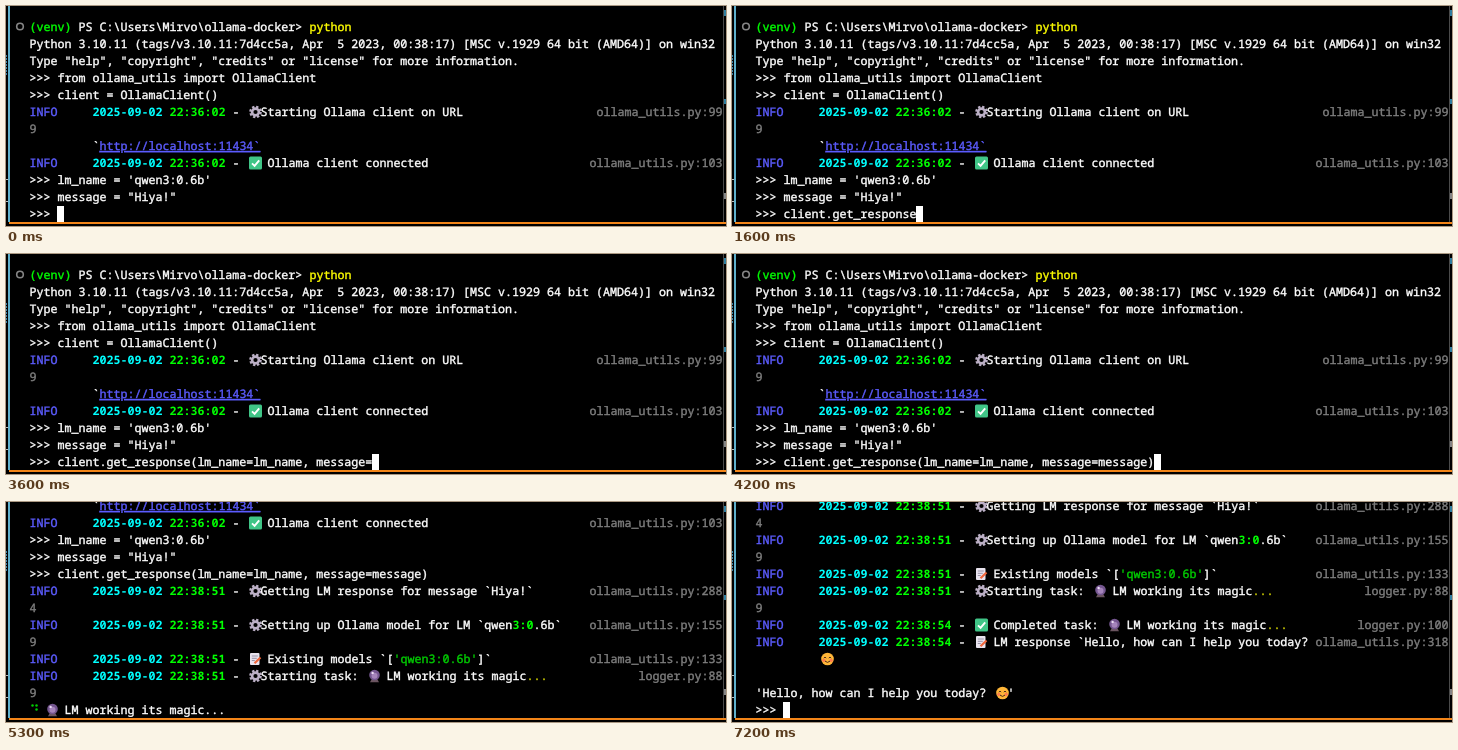
Write an HTML page that moves like this. It is 720 px wide and 220 px high and loops after 7.3 s.

```html
<!DOCTYPE html>
<html lang="en">
<head>
<meta charset="utf-8">
<title>Terminal session</title>
<style>
  html, body { margin: 0; width: 100%; height: 100%; overflow: hidden; background: #000; }
  svg { display: block; }
  text {
    font: 11.667px "Noto Sans Mono", "DejaVu Sans Mono", monospace;
    text-rendering: geometricPrecision;
    white-space: pre;
    color: #fff;
    fill: currentColor;
    stroke: currentColor;
    stroke-width: .4px;
  }
  .bold, .lime, .cyan { font-weight: 700; stroke: none; }
  .green { color: #00cd00; }
  .bright, .lime { color: #0f0; }
  .cyan { color: #0ff; }
  .yellow { color: #ff0; }
  .dots { color: #cdcd00; }
  .blue, .link { color: #5c5cff; }
  .link { text-decoration: underline; }
  .gray { color: #7f7f7f; }
</style>
</head>
<body>
<svg id="stage" width="720" height="220" viewBox="0 0 720 220">
  <defs>
    <g id="gear" fill="none" stroke="#bcb0c6">
      <circle cx="6.5" cy="6.5" r="5.2" stroke-width="2.2" stroke-dasharray="2.3 1.784"/>
      <circle cx="6.5" cy="6.5" r="3.4" stroke-width="2.6"/>
    </g>
    <g id="check">
      <rect width="13" height="13" rx="1.5" fill="#40c587"/>
      <path d="M3 6.8 5.6 9.4 10.2 3.8" fill="none" stroke="#fff" stroke-width="1.9"/>
    </g>
    <g id="memo">
      <rect x="1" y=".5" width="9.5" height="12" rx="1" fill="#e9e4ef"/>
      <path d="M2.8 3.5h6M2.8 5.8h5M2.8 8h3" stroke="#9a93a8"/>
      <path d="M5.5 10.8 11.5 5" stroke="#f0663c" stroke-width="2.2"/>
    </g>
    <g id="ball">
      <path d="M2 12.8 3.8 9.5h5.4l1.8 3.3z" fill="#6b5560"/>
      <circle cx="6.5" cy="5.5" r="5.3" fill="#74568f"/>
      <circle cx="6.5" cy="6.3" r="3" fill="#a584bb"/>
      <circle cx="4.6" cy="3.4" r="1.2" fill="#ecdcf5"/>
    </g>
    <g id="smile">
      <circle cx="6.5" cy="6.5" r="6.3" fill="#ffb638"/>
      <circle cx="2.8" cy="7.8" r="1.6" fill="#ff7a4d"/>
      <circle cx="10.2" cy="7.8" r="1.6" fill="#ff7a4d"/>
      <path d="M2.8 5.6q1.2-2 2.4 0M7.8 5.6q1.2-2 2.4 0M4 8.6q2.5 2.6 5 0" fill="none" stroke="#4a2d1c"/>
    </g>
  </defs>
  <g id="log"><circle cx="14" cy="20.5" r="3.3" fill="none" stroke="#858585" stroke-width="1.6"/></g>
  <g id="spinner"></g>
  <rect id="cursor" y="200" width="7" height="16" fill="#fff"/>
  <g id="frame">
    <path d="M717.5 0V216" stroke="#4a4a4a"/>
    <path d="M718 4h2v6h-2zM718 93h2v5h-2z" fill="#2f7fa0"/>
    <path d="M718 187h2v6h-2z" fill="#858585"/>
    <path d="M.5 49V70" stroke="#3d85a8" stroke-dasharray="2 1"/>
    <path d="M0 173.5h2M0 195.5h2" stroke="#bbb"/>
    <rect x="2" width="2" height="216" fill="#5fb0cc"/>
    <rect x="3" y="216" width="717" height="2" fill="#f38518"/>
  </g>
</svg>
<script>
const LOOP = 7300, STEP = 100, RUN = 4300, DONE = 7100;
const LEFT = 23, TOP = 13, CELL = 7, LINE = 17, SCREEN_ROWS = 12;
const COMMAND = "client.get_response(lm_name=lm_name, message=message)";
const TYPING = [[0, 0], [800, 10], [2400, 28], [3200, 38], [3600, 45], [4000, 51], [4200, 53]];
const SPINNER = "⠋⠙⠹⠸⠼⠴⠦⠧⠇⠏", SPIN_MS = 87.5;

const $ = id => document.getElementById(id);
const log = $("log"), spinner = $("spinner"), cursor = $("cursor");
const rows = [];

function add(parent, tag, attrs = {}) {
  const node = document.createElementNS("http://www.w3.org/2000/svg", tag);
  for (const key in attrs) node.setAttribute(key, attrs[key]);
  return parent.appendChild(node);
}

// Parts: a number jumps to a column, "#name" is a two-cell icon, [text, style] is coloured text.
function write(parent, line, parts) {
  let col = 0;
  for (const part of parts) {
    if (typeof part === "number") { col = part; continue; }
    const [text, style = ""] = [].concat(part);
    const x = LEFT + col * CELL, y = TOP + line * LINE;
    if (text[0] === "#") {
      add(parent, "use", { href: text, x: x + 3, y: y + 1.5 });
      col += 2;
    } else {
      add(parent, "text", { x: x + .5, y: y + 12, class: style }).textContent = text;
      col += text.length;
    }
  }
}

function row(...parts) {
  const group = add(log, "g");
  write(group, rows.length, parts);
  rows.push(group);
}

function info(time, path, ...parts) {
  row(["INFO", "blue"], 9, ["2025-09-02", "cyan"], " ", [time, "lime"], " - ",
    ...parts, 99 - path.length, [path, "gray"]);
}

const task = ["#ball", " LM working its magic", ["...", "dots"]];

row(["(venv)", "bright"], " PS C:\\Users\\Mirvo\\ollama-docker> ", ["python", "yellow"]);
row("Python 3.10.11 (tags/v3.10.11:7d4cc5a, Apr  5 2023, 00:38:17) [MSC v.1929 64 bit (AMD64)] on win32");
row('Type "help", "copyright", "credits" or "license" for more information.');
row(">>> from ollama_utils import OllamaClient");
row(">>> client = OllamaClient()");
info("22:36:02", "ollama_utils.py:99", "#gear", "Starting Ollama client on URL");
row(["9", "gray"]);
row(9, "`", ["http://localhost:11434`", "link"]);
info("22:36:02", "ollama_utils.py:103", "#check", " Ollama client connected");
row(">>> lm_name = 'qwen3:0.6b'");
row('>>> message = "Hiya!"');
row(">>> ", " ");
const typed = rows[11].lastChild;
info("22:38:51", "ollama_utils.py:288", "#gear", "Getting LM response for message `Hiya!`");
row(["4", "gray"]);
info("22:38:51", "ollama_utils.py:155", "#gear", "Setting up Ollama model for LM `qwen", ["3:0", "lime"], ".6b`");
row(["9", "gray"]);
info("22:38:51", "ollama_utils.py:133", "#memo", " Existing models `", ["[", "bold"],
  ["'qwen3:0.6b'", "green"], ["]", "bold"], "`");
info("22:38:51", "logger.py:88", "#gear", "Starting task: ", ...task);
row(["9", "gray"]);
info("22:38:54", "logger.py:100", "#check", " Completed task: ", ...task);
info("22:38:54", "ollama_utils.py:318", "#memo", " LM response `Hello, how can I help you today?");
row(9, "#smile");
row();
row("'Hello, how can I help you today? ", "#smile", "'");
row(">>> ");

write(spinner, SCREEN_ROWS - 1, [2, "#ball", " LM working its magic..."]);
const dots = [0, 1, 2, 3, 4, 5].map(i => add(spinner, "circle", {
  cx: 26.5 + 4 * (i / 3 | 0), cy: 203.5 + 4 * (i % 3), r: 1.25, fill: "#00cd00"
}));

function typedCount(t) {
  const next = TYPING.findIndex(key => key[0] > t);
  if (next < 0) return COMMAND.length;
  const [t0, n0] = TYPING[next - 1], [t1, n1] = TYPING[next];
  return Math.round(n0 + (n1 - n0) * (t - t0) / (t1 - t0));
}

const show = (node, on) => node.setAttribute("visibility", on ? "visible" : "hidden");

function draw(t) {
  const running = t >= RUN && t < DONE, done = t >= DONE;
  const count = typedCount(t);
  const lines = done ? rows.length : running ? 20 : SCREEN_ROWS;
  const visible = running ? lines - 1 : lines;

  typed.textContent = COMMAND.slice(0, count);
  rows.forEach((group, i) => show(group, i < visible));
  log.setAttribute("transform", `translate(0 ${(SCREEN_ROWS - lines) * LINE})`);

  show(cursor, !running);
  cursor.setAttribute("x", LEFT + CELL * (4 + (done ? 0 : count)));

  show(spinner, running);
  const glyph = SPINNER.charCodeAt(Math.max(0, Math.floor((t - RUN) / SPIN_MS)) % SPINNER.length);
  dots.forEach((dot, i) => show(dot, running && glyph >> i & 1));
}

const start = performance.now();
function tick() {
  const t = (performance.now() - start) % LOOP;
  draw(Math.floor(t / STEP) * STEP);
  requestAnimationFrame(tick);
}
tick();
</script>
</body>
</html>
```
